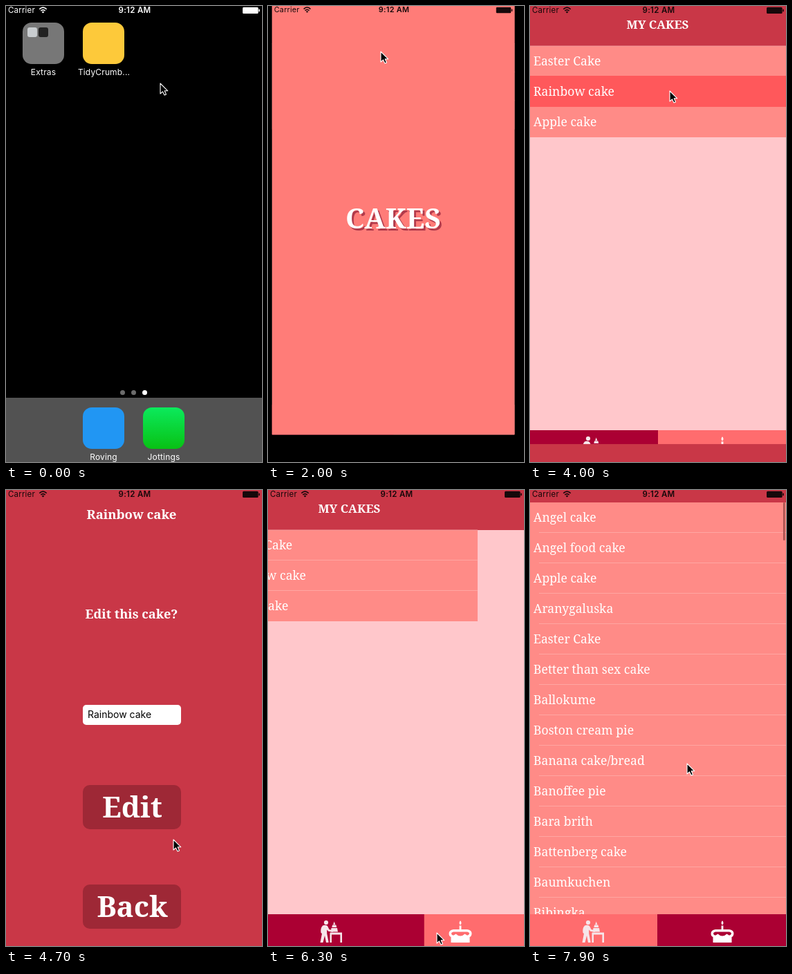
An HTML page for the animation above (8000 ms loop, 370 px wide and 660 px high).

```html
<!DOCTYPE html>
<html lang="en">
<head>
<meta charset="utf-8">
<title>Cake list app</title>
<style>
  html, body { margin: 0; width: 100%; height: 100%; overflow: hidden; background: #000; }
  svg { display: block; width: 370px; height: 660px; overflow: hidden; }
  text { white-space: pre; }
  .ui { font-family: Inter, "Liberation Sans", sans-serif; }
  .serif { font-family: "Noto Serif", serif; fill: #fff; }
  .bold { font-weight: 700; }
  .mid { text-anchor: middle; }
  .row { font-size: 17.6px; }
  .label { font-size: 12px; letter-spacing: .15px; fill: #fff; text-anchor: middle; }
</style>
</head>
<body>
<svg id="stage" viewBox="0 0 370 660" xmlns="http://www.w3.org/2000/svg"></svg>
<script>
const LOOP = 8000;
const RED = '#c93747', ROW = '#ff8b87', TAB = '#ff6c6e', DARK = '#ab0033';
const MINE = ['Easter Cake', 'Rainbow cake', 'Apple cake'];
const ALL = ['Angel cake', 'Angel food cake', 'Apple cake', 'Aranygaluska', 'Easter Cake',
  'Better than sex cake', 'Ballokume', 'Boston cream pie', 'Banana cake/bread', 'Banoffee pie',
  'Bara brith', 'Battenberg cake', 'Baumkuchen', 'Bibingka'];

const box = (x, y, w, h, fill, r = 0, more = '') =>
  `<rect x="${x}" y="${y}" width="${w}" height="${h}" rx="${r}" fill="${fill}" ${more}/>`;
const serif = (x, y, size, str, more = '') =>
  `<text class="serif bold mid" x="${x}" y="${y}" font-size="${size}" ${more}>${str}</text>`;
const label = (x, y, str) => `<text class="ui label" x="${x}" y="${y}">${str}</text>`;

// list rows; "under" is drawn between the cells and their text
const rows = (names, under = '') =>
  box(0, 0, 370, names.length * 44, ROW) +
  names.slice(1).map((_, i) => box(13, i * 44 + 43, 357, 1, '#ffa6a2')).join('') +
  under +
  names.map((name, i) => `<text class="serif row" x="5" y="${i * 44 + 28}">${name}</text>`).join('');

const status = color => `
  <g class="ui" fill="${color}" font-size="11.5">
    <text x="3" y="10" letter-spacing=".2">Carrier</text>
    <text x="186" y="10" class="mid" font-weight="600" letter-spacing=".3">9:12 AM</text>
    <g fill="none" stroke="${color}" stroke-width="1.6">
      <path d="M48.3 4.6Q53.5 -.2 58.7 4.6M50.3 7Q53.5 4.1 56.7 7"/>
    </g>
    <path d="M51.6 8.4Q53.5 6.9 55.4 8.4L53.5 10.5Z"/>
    <rect x="342" y="1.8" width="22.6" height="9.2" rx="1.5"/>
    <rect x="365.2" y="4.6" width="1.6" height="3.8" rx=".8"/>
  </g>`;

const button = (y, str) => box(111, y, 142, 64, '#9e2836', 10) + serif(182.5, y + 47, 42, str);

const baker = `
  <g fill="#f6e6ea">
    <circle cx="84" cy="626" r="3.1"/>
    <path d="M79 630.5Q83 629 86 631L88.5 636L94 637.5V639.8L87.3 638.8L85.2 636.5V642L87.5 653.5V655H84L82 645L79.5 655H75.5L78 642L76.5 641Q75.5 634 79 630.5Z"/>
    <path d="M89.5 640.6H107V655H104.4V643.5H92V655H89.5Z"/>
    <path d="M95.7 624.5L97.2 629H94.2ZM93.2 629.5H98.4L99.2 633H92.3ZM91.5 634H100L101 639.6H90.6Z"/>
  </g>`;
const cake = `
  <g fill="#fff">
    <path d="M278 623.3Q281 627.2 278 629.4Q275 627.2 278 623.3Z"/>
    <rect x="276.6" y="630.5" width="2.8" height="6"/>
    <path fill-rule="evenodd" d="M268 636H288Q294.5 637 294.5 642Q294 646.500 291.500 647V655H264.500V647Q261.500 646 261.500 642Q261.500 637 268 636Z
      M268.500 639.500H287.500Q291 640 291 642Q290 645 287.500 644.500L284.500 642.500Q281.500 645.500 278 645.500Q274.500 645.500 271.500 642.500L268.500 644.500Q265.500 645 265 642Q265 640 268.500 639.500Z"/>
  </g>`;

document.getElementById('stage').innerHTML = `
  <defs>
    <linearGradient id="green" x2="0" y2="1">
      <stop stop-color="#0bea5c"/><stop offset="1" stop-color="#08c114"/>
    </linearGradient>
  </defs>
  ${box(0, 0, 370, 660, '#000')}
  <g id="home">
    ${box(24, 24, 60, 60, '#777', 13)}
    ${box(31, 31, 14, 14, '#c9cdd0', 3)}${box(47, 31, 14, 14, '#222', 3)}
    ${label(54, 100, 'Extras')}
    ${box(111, 24, 60, 60, '#fdc93a', 13)}
    ${label(141.5, 100, 'TidyCrumb...')}
    <g fill="#6c6c6c"><circle cx="168.5" cy="559.5" r="3.5"/><circle cx="184.5" cy="559.5" r="3.5"/>
      <circle cx="200.5" cy="559.5" r="3.5" fill="#fff"/></g>
    ${box(0, 567, 370, 93, '#525252')}
    ${box(111, 581, 60, 60, '#2196f3', 13)}${label(141, 657, 'Roving')}
    ${box(198, 581, 60, 60, 'url(#green)', 13)}${label(228, 657, 'Jottings')}
  </g>
  <g id="homeStatus">${status('#fff')}</g>
  <g id="app">
    <g id="main">
      ${box(0, 0, 370, 660, '#ffc7cb')}
      <g id="page2"><g id="list">${rows(ALL)}</g></g>
      ${box(0, 0, 370, 58, RED, 0, 'id="nav"')}
      <g id="page1">
        ${serif(184.5, 33, 17, 'MY CAKES')}
        <g transform="translate(0 58)">
          ${rows(MINE, box(0, 43, 370, 45, '#ff585b', 0, 'id="pick"'))}
          ${box(0, -.5, 370, 1, '#f49a9b')}
        </g>
      </g>
      ${box(366, 18, 2.5, 55, '#a8504f', 1.2, 'id="bar"')}
      ${box(0, 614, 370, 46, TAB)}
      ${box(0, 614, 185, 46, DARK, 0, 'id="mark"')}
      ${baker}${cake}
    </g>
    <g id="sheet">
      ${box(0, 0, 370, 660, RED)}
      ${serif(181.5, 42, 18.5, 'Rainbow cake')}
      ${serif(181.5, 186, 18.2, 'Edit this cake?')}
      ${box(111, 311, 142, 29, '#fff', 5)}
      <text class="ui" x="118" y="330" font-size="14">Rainbow cake</text>
      ${button(427, 'Edit')}${button(571, 'Back')}
    </g>
    <g id="splash">
      ${box(0, 0, 370, 660, '#ff7c78')}
      ${serif(188, 346, 43, 'CAKES', 'style="fill:#b13a4b"')}
      ${serif(185, 343, 43, 'CAKES')}
    </g>
    <g>${status('#16080a')}</g>
  </g>
  <g id="cursor">
    <path d="M0 0V15L3.5 11.9L6 17L8.5 15.9L6.2 10.8H10.8Z" fill="#000" stroke="#fff" stroke-width="1.1" stroke-linejoin="round"/>
  </g>`;

const el = {};
document.querySelectorAll('[id]').forEach(n => el[n.id] = n);

const clamp = v => Math.min(1, Math.max(0, v));
const ramp = (t, start, dur) => clamp((t - start) / dur);
const ease = u => u * u * (3 - 2 * u);
// critically damped spring, settling at 1
const spring = (t, start, w) => {
  const x = Math.max(0, t - start) / 1000 * w;
  const p = 1 - (1 + x) * Math.exp(-x);
  return p > .997 ? 1 : p;
};
const set = (n, k, v) => el[n].setAttribute(k, v);
const move = (n, x, y) => set(n, 'transform', `translate(${x} ${y})`);
const show = (n, v) => set(n, 'opacity', v);

// time, x, y of the pointer tip
const PATH = [[0, 223, 112], [900, 174, 80], [1400, 163, 66], [2050, 163, 66], [2600, 213, 292],
  [2750, 213, 292], [3600, 205, 166], [3800, 202, 123], [4250, 202, 123], [4700, 242, 506],
  [5050, 208, 608], [5750, 208, 608], [6000, 244, 641], [6600, 244, 641], [7250, 231, 440],
  [7350, 231, 440], [7800, 227, 396], [8000, 227, 396]];
function pointer(t) {
  const i = PATH.findIndex(k => k[0] > t);
  const [t0, x0, y0] = PATH[i - 1], [t1, x1, y1] = PATH[i];
  const u = ease((t - t0) / (t1 - t0));
  return [x0 + (x1 - x0) * u, y0 + (y1 - y0) * u];
}

// the window grows out of the icon's cell while the home screen zooms past
function launch(t) {
  const p = spring(t, 1640, 12);
  const x = 84 * (1 - p), w = 90 + 280 * p, h = 93 + 567 * p;
  set('app', 'transform', `translate(${x} 0) scale(${w / 370} ${h / 660})`);
  show('app', ramp(t, 1640, 150));
  set('home', 'transform', `translate(${x + w / 2} ${h / 2}) scale(${w / 90}) translate(-129 -46.5)`);
  show('home', clamp(1 - p * 1.3));
  show('homeStatus', clamp(1 - p * 3));
  show('splash', 1 - ramp(t, 2250, 250));
}

function draw(t) {
  launch(t);

  const up = spring(t, 3984, 18.26) - spring(t, 5130, 18.26);
  move('sheet', 0, 660 * (1 - up));
  show('sheet', up > 0 ? 1 : 0);
  show('pick', t >= 3975 && t < 5500 ? 1 : 0);

  const slide = 370 * ease(ramp(t, 6210, 335));
  move('page1', -slide, 0);
  move('page2', 370 - slide, 0);

  // the tab marker stretches to the right, then its left edge follows
  const left = 184 * ease(ramp(t, 6330, 300));
  set('mark', 'x', left);
  set('mark', 'width', 185 + 185 * ease(ramp(t, 6210, 300)) - left);

  const top = 58 - 40 * ease(ramp(t, 7350, 450));
  set('nav', 'height', top);
  move('list', 0, top);
  show('list', t >= 6700 ? 1 : 0);
  move('bar', 0, top - 18);
  show('bar', ramp(t, 7350, 100));

  move('cursor', ...pointer(t));
}

function tick(now) {
  draw(now % LOOP);
  requestAnimationFrame(tick);
}
draw(0);
requestAnimationFrame(tick);
</script>
</body>
</html>
```
